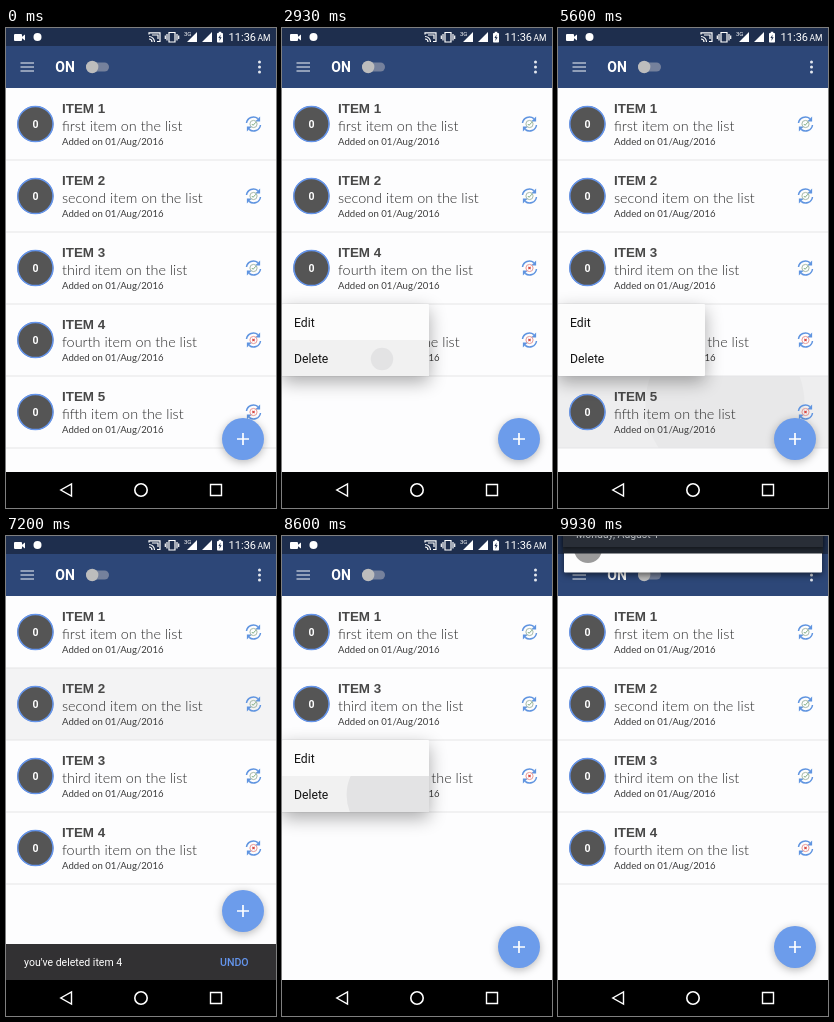
Recreate the animation shown at these times as an HTML page with a canvas. Size 270x480 px, loop 9.99 s.

```html
<!DOCTYPE html>
<html lang="en">
<head>
<meta charset="utf-8">
<title>Item list</title>
<style>
  html, body { margin: 0; width: 100%; height: 100%; overflow: hidden; background: #000; }
  canvas { display: block; width: 270px; height: 480px; }
</style>
</head>
<body>
<canvas id="stage"></canvas>
<script>
const LOOP = 9990, STEP = 66.6, ROW = 72, TOP = 60;
const BLUE = '#6495ed', NAVY = '#1e2e4d';
const canvas = document.getElementById('stage');
const ctx = canvas.getContext('2d');
const scale = window.devicePixelRatio || 1;
canvas.width = 270 * scale;
canvas.height = 480 * scale;

const words = ['first', 'second', 'third', 'fourth', 'fifth'];

// Visible items from each moment on.
const lists = [
  [0, [1, 2, 3, 4, 5]],
  [2925, [1, 2, 4, 5]],
  [3590, [1, 2, 3, 4, 5]],
  [6180, [1, 2, 3, 4]],
  [8500, [1, 3, 4]],
  [9270, [1, 2, 3, 4]]
];
const menus = [
  { row: 2, y: 276, press: 1520, open: 2060, tap: 2893, close: 3000, tapX: 100 },
  { row: 4, y: 276, press: 4860, open: 5400, tap: 6120, close: 6260, tapX: 105 },
  { row: 1, y: 204, press: 6990, open: 7600, tap: 8440, close: 8630, tapX: 110 }
];
const snacks = [
  { index: 2, show: 3060, undo: 3460, hide: 3590 },
  { index: 4, show: 6320, undo: Infinity, hide: 8080 },
  { index: 1, show: 8690, undo: 9160, hide: 9270 }
];

const ramp = (t, start, length) => Math.min(1, Math.max(0, (t - start) / length));

// Cubic bezier (.4, 0, .2, 1)
function ease(x) {
  let lo = 0, hi = 1;
  for (let i = 0; i < 20; i++) {
    const u = (lo + hi) / 2, v = 1 - u;
    if (1.2 * u * v * v + 0.6 * u * u * v + u * u * u < x) lo = u; else hi = u;
  }
  return lo * lo * (3 - 2 * lo);
}

function rect(x, y, w, h, color, radius = 0) {
  ctx.fillStyle = color;
  ctx.beginPath();
  ctx.roundRect(x, y, w, h, radius);
  ctx.fill();
}

function disc(x, y, r, color) {
  ctx.fillStyle = color;
  ctx.beginPath();
  ctx.arc(x, y, r, 0, Math.PI * 2);
  ctx.fill();
}

function ring(x, y, r, color, width) {
  ctx.strokeStyle = color;
  ctx.lineWidth = width;
  ctx.beginPath();
  ctx.arc(x, y, r, 0, Math.PI * 2);
  ctx.stroke();
}

function path(d, color, width) {
  const shape = new Path2D(d);
  if (width) {
    ctx.strokeStyle = color;
    ctx.lineWidth = width;
    ctx.stroke(shape);
  } else {
    ctx.fillStyle = color;
    ctx.fill(shape);
  }
}

function text(value, x, y, font, color, align = 'left') {
  ctx.font = font;
  ctx.fillStyle = color;
  ctx.textAlign = align;
  ctx.fillText(value, x, y);
}

function withShadow(color, blur, dy, draw) {
  ctx.save();
  ctx.shadowColor = color;
  ctx.shadowBlur = blur * scale;
  ctx.shadowOffsetY = dy * scale;
  draw();
  ctx.restore();
}

function clipped(x, y, w, h, draw) {
  ctx.save();
  ctx.beginPath();
  ctx.rect(x, y, w, h);
  ctx.clip();
  draw();
  ctx.restore();
}

function drawStatusBar() {
  rect(0, 0, 270, 18, NAVY);
  rect(8, 6, 8, 7, '#fff', 1);
  path('M15 9.5 L19 6.5 V12.5 Z', '#fff');
  disc(31.5, 9, 4, '#fff');
  path('M143 6.5 V4.8 H154 V13.5 H151 M143 8.5 A5.5 5.5 0 0 1 148.5 14 M143 11 A3 3 0 0 1 146 14 M146 7 H152 V11', '#fff', 1.2);
  path('M163 4.5 H169 V14 H163 Z M161 6 V12.5 M171 6 V12.5 M159.3 7.5 V11 M172.7 7.5 V11', '#fff', 1.2);
  text('3G', 178, 8, '6px Roboto, sans-serif', '#fff');
  path('M181 14 L191 4 V14 Z M196 14 L206 4 V14 Z', '#fff');
  rect(211, 5, 6, 9.5, '#fff', 0.8);
  rect(212.7, 3.8, 2.6, 1.4, '#fff');
  path('M214.6 6.5 L212.4 10 H213.8 L213.4 13 L215.6 9.3 H214.2 Z', NAVY);
  text('11:36', 250, 13, '11px Roboto, sans-serif', '#fff', 'right');
  text('AM', 264.5, 13, '8.5px Roboto, sans-serif', '#fff', 'right');
}

function drawToolbar() {
  rect(0, 18, 270, 42, '#2d4778');
  for (const y of [35, 39, 43]) rect(14.5, y - 0.6, 13.5, 1.2, '#d4dae5');
  for (const y of [34, 39, 44]) disc(253.5, y, 1.5, '#e4e8ef');
  text('ON', 49.3, 44, 'bold 14px Roboto, sans-serif', '#fff');
  rect(80, 34.5, 23, 9, '#75819c', 4.5);
  disc(86.2, 39, 6.2, '#bdbdbd');
}

function drawSync(x, y, ok) {
  ctx.save();
  ctx.translate(x, y);
  for (let i = 0; i < 2; i++) {
    path('M-7 -1 A7 7 0 0 1 4.4 -5.4', '#5f94e0', 1.5);
    path('M6.6 -7.6 V-2.6 H1.6 Z', '#5f94e0');
    ctx.rotate(Math.PI);
  }
  ring(0, 0, 3.6, ok ? '#9db3a0' : '#e58f8b', 0.9);
  if (ok) path('M-1.7 0 L-0.4 1.3 L2.4 -1.8', '#7fae83', 1);
  else path('M-1.1 -1.1 L1.1 1.1 M1.1 -1.1 L-1.1 1.1', '#d94843', 1.2);
  ctx.restore();
}

function drawRowPress(t, menu) {
  const y = TOP + menu.row * ROW;
  const fade = 1 - ramp(t, menu.open + 250, 180);
  if (t < menu.press || fade === 0) return;
  clipped(0, y, 270, ROW, () => {
    ctx.globalAlpha = fade;
    const strength = 0.04 + 0.02 * ramp(t, menu.press + 250, 250);
    rect(0, y, 270, ROW, `rgba(0,0,0,${strength * ramp(t, menu.press, 180)})`);
    const radius = 80 * Math.pow(ramp(t, menu.open, 195), 1.3);
    if (radius) disc(167, y + 28, radius, 'rgba(0,0,0,.025)');
  });
}

function drawItem(n, position) {
  const y = TOP + position * ROW;
  disc(29.4, y + 36, 18, '#555');
  ring(29.4, y + 36, 17.6, BLUE, 1.5);
  text('0', 29.4, y + 40, 'bold 10.5px Roboto, sans-serif', '#fff', 'center');
  text('ITEM ' + n, 56, y + 24.5, 'bold 13.4px "Liberation Sans", sans-serif', '#484848');
  text(words[n - 1] + ' item on the list', 56, y + 42.6, '300 14.4px Lato, sans-serif', '#2a2a2a');
  text('Added on 01/Aug/2016', 56, y + 57, '9.6px Lato, sans-serif', '#3c3c3c');
  drawSync(247.5, y + 36, n < 4);
  rect(0, y + ROW - 0.5, 270, 1, '#e6e6e8');
}

function drawMenu(t, { y, open, tap, close, tapX }) {
  const alpha = ramp(t, open, 130) * (1 - ramp(t, close, 130));
  if (alpha === 0) return;
  ctx.save();
  ctx.globalAlpha = alpha;
  withShadow('rgba(0,0,0,.33)', 18, 6, () => rect(0, y, 147, ROW, '#fcfcfc', 1));
  if (t >= tap) {
    clipped(0, y + 36, 147, 36, () => {
      rect(0, y + 36, 147, 36, '#f1f1f1');
      disc(tapX, y + 55, (t - tap) * 0.3, '#e3e3e4');
    });
  }
  text('Edit', 12, y + 22.7, '12.2px Roboto, sans-serif', '#151515');
  text('Delete', 12, y + 58.7, '12.2px Roboto, sans-serif', '#151515');
  ctx.restore();
}

const snackLift = (t, s) => ease(ramp(t, s.show, 250)) - ease(ramp(t, s.hide, 250));

function drawSnack(t, s) {
  const y = 444 - 36 * snackLift(t, s);
  if (y === 444) return;
  rect(0, y, 270, 36, '#323133');
  if (t >= s.undo) rect(198, y + 4, 60, 28, '#48484a', 2);
  ctx.save();
  ctx.globalAlpha = ramp(t, s.show + 70, 180) * (1 - ramp(t, s.hide, 180));
  text("you've deleted item " + s.index, 18, y + 22, '10.5px Roboto, sans-serif', '#fff');
  text('UNDO', 214, y + 22, '500 10.6px Roboto, sans-serif', BLUE);
  ctx.restore();
}

function drawFab(y) {
  withShadow('rgba(0,0,0,.28)', 8, 2, () => disc(237, y, 21, '#6c9ceb'));
  path(`M231 ${y} h12 M237 ${y - 6} v12`, '#fff', 1.7);
}

function drawNavBar() {
  rect(0, 444, 270, 36, '#000');
  path('M65.5 456 V468 L54.8 462 Z', '#fff', 1.4);
  ring(135, 462, 6.2, '#fff', 1.6);
  path('M204.5 456.5 H215.5 V467.5 H204.5 Z', '#fff', 1.4);
}

function drawShade(y) {
  rect(0, 0, 270, 18, NAVY);
  withShadow('rgba(0,0,0,.6)', 7, 2, () => rect(6, y - 40, 258, 76.5, '#fdfdfd', 1));
  disc(30, y + 13, 14, '#9b9b9b');
  rect(5, y - 40, 260, 57.5, '#20262f');
  withShadow('rgba(0,0,0,.5)', 4, 1, () => rect(5, y - 40, 260, 51, '#292e37'));
  text('Monday, August 1', 18, y + 2, '10.5px Roboto, sans-serif', '#b4b8bc');
}

function draw(t) {
  ctx.setTransform(scale, 0, 0, scale, 0, 0);
  rect(0, 0, 270, 480, '#fdfdfe');
  menus.forEach(menu => drawRowPress(t, menu));
  const items = lists.filter(([start]) => t >= start).pop()[1];
  items.forEach(drawItem);
  drawToolbar();
  drawStatusBar();
  snacks.forEach(s => drawSnack(t, s));
  drawFab(411 - 36 * snacks.reduce((sum, s) => sum + snackLift(t, s), 0));
  menus.forEach(menu => drawMenu(t, menu));
  drawNavBar();
  if (t >= 9855) drawShade(t < 9920 ? -16 : 0);
}

// The screen advances in 15 Hz steps.
function tick() {
  const t = performance.now() % LOOP;
  draw(Math.floor(t / STEP) * STEP);
  requestAnimationFrame(tick);
}
tick();
</script>
</body>
</html>
```
